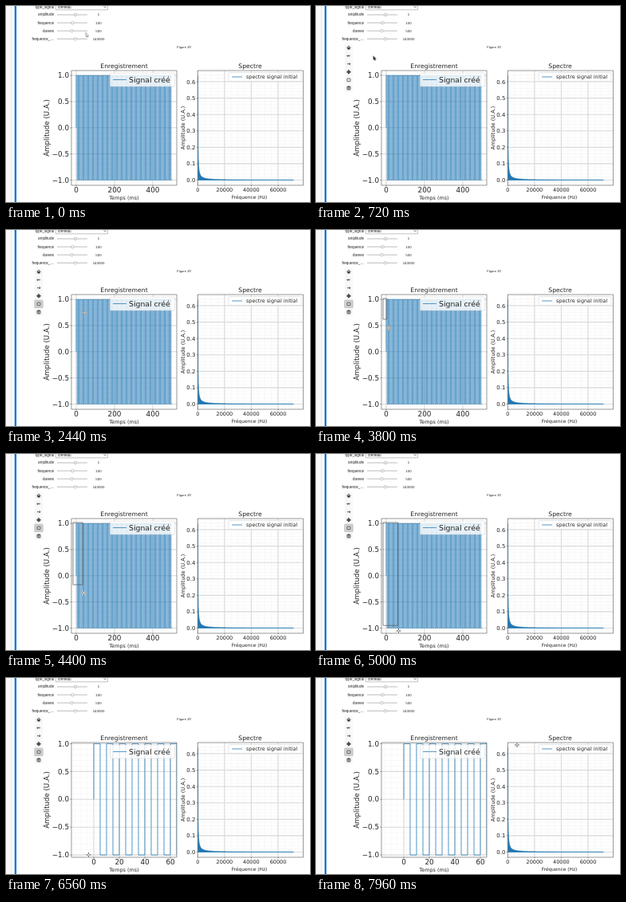
An HTML page with a canvas that plays this animation: 381 by 246 pixels, repeating every 8000 ms.

```html
<!DOCTYPE html>
<html lang="fr">
<head>
<meta charset="utf-8">
<title>Signal et spectre</title>
<style>
html, body { margin: 0; width: 100%; height: 100%; overflow: hidden; background: #fff; }
canvas { display: block; width: 381px; height: 246px; }
</style>
</head>
<body>
<canvas id="stage"></canvas>
<script>
const W = 381, H = 246, LOOP = 8000;
const BLUE = '#1f77b4', INK = '#222';
const PLOT = '"DejaVu Sans", sans-serif', UI = '"Liberation Sans", Arial, sans-serif';
const canvas = document.getElementById('stage');
const c = canvas.getContext('2d');
const dpr = window.devicePixelRatio || 1;
canvas.width = W * dpr;
canvas.height = H * dpr;

const TOOLBAR_AT = 600, HOVER_PAN = 1200, PICK_ZOOM = 1720;
const DRAG_AT = 3400, RELEASE_AT = 5400, LAG = 120;

// Pointer stops: time, x, y, linear flag
const stops = [
  [0, 100, 35], [300, 99, 37], [840, 68, 68], [1280, 42, 83], [1440, 42, 84],
  [1560, 42, 94], [1720, 42, 94], [2400, 99, 104], [2560, 99, 104],
  [3160, 84, 86], [DRAG_AT, 84, 86], [3800, 91, 123, 1], [4960, 103.5, 222, 1],
  [6640, 103.5, 222], [7900, 252, 84], [LOOP, 252, 84]
];

function pointerAt(t) {
  const i = Math.max(1, stops.findIndex(s => s[0] >= t));
  const [t0, x0, y0] = stops[i - 1], [t1, x1, y1, linear] = stops[i];
  let k = (t - t0) / (t1 - t0);
  if (!linear) k = k * k * (3 - 2 * k);
  return { x: x0 + (x1 - x0) * k, y: y0 + (y1 - y0) * k };
}

function text(str, x, y, size, align = 'left', font = PLOT, color = INK) {
  c.font = `${size}px ${font}`;
  c.textAlign = align;
  c.fillStyle = color;
  c.fillText(str, x, y);
}

function vertical(str, x, y, size) {
  c.save();
  c.translate(x, y);
  c.rotate(-Math.PI / 2);
  text(str, 0, 0, size, 'center');
  c.restore();
}

function line(points, color, width) {
  c.beginPath();
  points.forEach(([x, y]) => c.lineTo(x, y));
  c.strokeStyle = color;
  c.lineWidth = width;
  c.stroke();
}

function box(x, y, w, h, fill, stroke, r = 0, width = 0.6) {
  c.beginPath();
  c.roundRect(x, y, w, h, r);
  if (fill) { c.fillStyle = fill; c.fill(); }
  if (stroke) { c.strokeStyle = stroke; c.lineWidth = width; c.stroke(); }
}

// Axis: origin pixel, pixels per unit, tick step, minor divisions, decimals
const axis = (origin, scale, step, minor, digits = 0) => ({
  step, minor, digits, px: v => origin + v * scale, val: p => (p - origin) / scale
});

const wide = { x: axis(88, 0.24, 200, 4), y: axis(152.8, -65.7, 0.5, 5, 1) };
const near = { x: axis(110, 1.6, 20, 4), y: axis(152.3, -69.8, 0.5, 5, 1) };
const freq = { x: axis(240.3, 0.001678, 20000, 4), y: axis(218.5, -205.8, 0.1, 5, 1) };
const left = { x: 82, y: 81, w: 132, h: 144 };
const right = { x: 240.3, y: 81, w: 132.2, h: 144 };

function ticks(a, from, to, minor) {
  const step = a.step / (minor ? a.minor : 1);
  const lo = Math.min(a.val(from), a.val(to)), hi = Math.max(a.val(from), a.val(to));
  const out = [];
  for (let i = Math.ceil(lo / step - 1e-6); i <= hi / step + 1e-6; i++) out.push(i * step);
  return out;
}

function label(v, digits) {
  const s = Math.abs(v).toFixed(digits);
  return v < -1e-9 ? '\u2212' + s : s;
}

function axes(r, view, xSize, ySize, draw) {
  const b = r.y + r.h, e = r.x + r.w;
  c.save();
  c.beginPath();
  c.rect(r.x, r.y, r.w, r.h);
  c.clip();
  for (const minor of [true, false]) {
    const color = minor ? '#f1f1f1' : '#dadada', width = minor ? 0.5 : 1.1;
    for (const v of ticks(view.x, r.x, e, minor)) {
      const x = view.x.px(v);
      line([[x, r.y], [x, b]], color, width);
    }
    for (const v of ticks(view.y, r.y, b, minor)) {
      const y = view.y.px(v);
      line([[r.x, y], [e, y]], color, width);
    }
  }
  draw(view);
  c.restore();
  box(r.x, r.y, r.w, r.h, null, '#555', 0, 0.6);
  for (const v of ticks(view.x, r.x, e)) {
    const x = view.x.px(v);
    line([[x, b], [x, b + 1.6]], '#555', 0.6);
    text(label(v, view.x.digits), x, b + 2.8 + xSize * 0.76, xSize, 'center');
  }
  for (const v of ticks(view.y, r.y, b)) {
    const y = view.y.px(v);
    line([[r.x - 1.6, y], [r.x, y]], '#555', 0.6);
    text(label(v, view.y.digits), r.x - 3, y + ySize * 0.36, ySize, 'right');
  }
}

function squareWave({ x, y }) {
  const pts = [[x.px(0), y.px(0)]];
  for (let i = 0; i < 100; i++) {
    const level = y.px(i % 2 ? -1 : 1);
    pts.push([x.px(i * 5), level], [x.px(i * 5 + 5), level]);
  }
  line(pts, BLUE, 0.75);
}

function spectrum({ x, y }) {
  c.beginPath();
  c.moveTo(x.px(0), y.px(0));
  for (let n = 1; n < 716; n += 2) c.lineTo(x.px(n * 100), y.px(2 / Math.PI / n));
  c.lineTo(x.px(71500), y.px(0));
  c.closePath();
  c.fillStyle = BLUE;
  c.fill();
  c.strokeStyle = BLUE;
  c.lineWidth = 0.6;
  c.stroke();
}

function legend(x, y, w, h, x0, x1, str, tx, size) {
  box(x, y, w, h, 'rgba(255,255,255,0.8)', 'rgba(204,204,204,0.8)', 1.5);
  line([[x0, y + h / 2], [x1, y + h / 2]], BLUE, 0.75);
  text(str, tx, y + h / 2 + size * 0.34, size);
}

function widgets() {
  box(0, 0, 7, H, '#f8f8f8');
  line([[7, 0], [7, H]], '#dedede', 0.8);
  box(10.7, 0, 2.4, H, '#1976d2');

  text('type_signal', 60, 2.6, 4.6, 'right', UI);
  text('creneau', 65, 2.6, 4.6, 'left', UI);
  box(62.5, -5, 65, 9.8, null, '#999', 0, 0.6);
  line([[122.5, 0.4], [124, 1.9], [125.5, 0.4]], '#444', 0.7);
  [['amplitude', 87, '1'], ['frequence', 83.5, '100'],
   ['durees', 82.5, '500'], ['frequence_\u2026', 87, '143000']].forEach(([name, x, value], i) => {
    const y = 11 + i * 10.1;
    text(name, 60, y + 1.4, 4.6, 'right', UI);
    line([[64, y], [102, y]], '#b5b5b5', 0.9);
    c.beginPath();
    c.arc(x, y, 1.7, 0, 7);
    c.fillStyle = '#fff';
    c.fill();
    c.strokeStyle = '#999';
    c.lineWidth = 0.6;
    c.stroke();
    text(value, 116, y + 1.4, 4.4, 'center', UI);
  });
  text('Figure 20', 223, 52.8, 4.2, 'center', UI);
}

function arrow(x, y, angle, len) {
  c.save();
  c.translate(x, y);
  c.rotate(angle);
  line([[-len, 0], [len, 0]], '#333', 0.8);
  line([[len - 1.3, -1.3], [len, 0], [len - 1.3, 1.3]], '#333', 0.8);
  c.restore();
}

const icons = [
  y => {
    line([[38.6, y], [41, y - 2.2], [43.4, y]], '#333', 0.9);
    box(39.4, y - 0.4, 3.2, 2.4, '#333');
  },
  y => arrow(41, y, Math.PI, 2),
  y => arrow(41, y, 0, 2),
  y => { for (let k = 0; k < 4; k++) arrow(41, y, k * Math.PI / 2, 2.3); },
  y => box(39, y - 1.8, 4, 3.6, null, '#444', 0.4, 0.8),
  y => {
    box(39, y - 2, 4, 4, null, '#333', 0.4, 0.8);
    box(39.8, y - 1.9, 2.4, 1.4, '#333');
    box(40.3, y + 0.3, 1.4, 1.3, '#333');
  }
];

function toolbar(t) {
  icons.forEach((draw, i) => {
    const y = 52.5 + i * 10.1;
    const hover = i === 3 && t >= HOVER_PAN && t < PICK_ZOOM;
    const active = i === 4 && t >= PICK_ZOOM;
    const fill = hover ? '#cfcfcf' : active ? '#d2d2d2' : '#f7f7f7';
    box(35.8, y - 4.7, 10.4, 9.4, fill, active ? '#aaa' : null, 0.5, 0.6);
    draw(y);
  });
}

function pointer(t, { x, y }) {
  const inPlot = t > PICK_ZOOM && x > 82;
  if (inPlot) {
    for (const [color, width] of [['#fff', 2], ['#444', 0.8]]) {
      line([[x - 3, y], [x + 3, y]], color, width);
      line([[x, y - 3], [x, y + 3]], color, width);
    }
    box(x - 1.3, y - 1.3, 2.6, 2.6, '#fff', '#555', 1.3, 0.5);
    return;
  }
  c.beginPath();
  [[0, 0], [0, 5], [1.2, 4], [2, 5.8], [2.8, 5.4], [2, 3.7], [3.6, 3.6]]
    .forEach(([dx, dy]) => c.lineTo(x + dx, y - 1.5 + dy));
  c.closePath();
  c.fillStyle = t < TOOLBAR_AT ? '#fff' : '#333';
  c.fill();
  c.strokeStyle = '#555';
  c.lineWidth = 0.5;
  c.stroke();
}

function render(t) {
  c.setTransform(dpr, 0, 0, dpr, 0, 0);
  c.fillStyle = '#fff';
  c.fillRect(0, 0, W, H);
  widgets();
  if (t >= TOOLBAR_AT) toolbar(t);

  axes(left, t < RELEASE_AT ? wide : near, 8.8, 8.8, squareWave);
  legend(130.5, 84, 81, 17, 134, 151, 'Signal créé', 154, 9.3);
  text('Enregistrement', 148, 78, 7.7, 'center');
  text('Temps (ms)', 148, 243, 6.4, 'center');
  vertical('Amplitude (U.A.)', 54, 153, 8.7);

  axes(right, freq, 6.5, 6.9, spectrum);
  legend(279, 83.5, 91, 11, 283, 296, 'spectre signal initial', 301, 6.4);
  text('Spectre', 306, 78, 7.7, 'center');
  text('Fréquence (Hz)', 305, 241.6, 5.9, 'center');
  vertical('Amplitude (U.A.)', 224, 153, 6.6);

  if (t >= DRAG_AT && t < RELEASE_AT) {
    const p = pointerAt(t - LAG);
    box(84, 86, p.x - 84, p.y - 86, null, '#555', 0, 0.7);
  }
  pointer(t, pointerAt(t));
}

const start = performance.now();
function tick() {
  render((performance.now() - start) % LOOP);
  requestAnimationFrame(tick);
}
tick();
</script>
</body>
</html>
```
